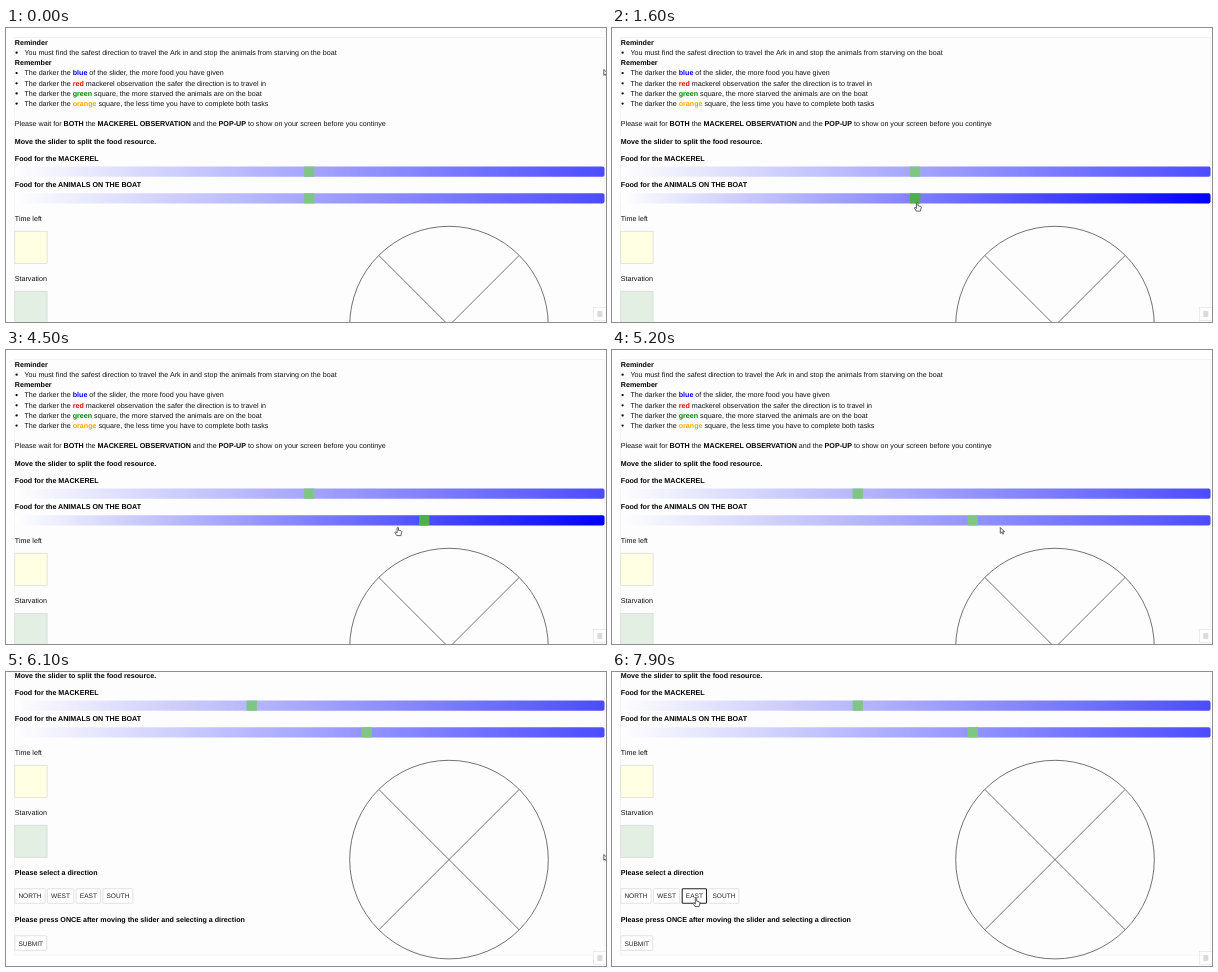
An HTML page that plays this animation: 600x294 px, repeating every 8000 ms.

```html
<!DOCTYPE html>
<html lang="en">
<head>
<meta charset="utf-8">
<title>Food sliders</title>
<style>
  html, body { margin: 0; width: 100%; height: 100%; overflow: hidden; background: #fff; }
  svg { display: block; width: 600px; height: 294px; }
  text { font: 7.13px "Liberation Sans", Arial, sans-serif; fill: #111; white-space: pre; text-rendering: geometricPrecision; }
  .b { font-weight: bold; fill: #000; }
  text.button { font-size: 6.55px; fill: #222; }
</style>
</head>
<body>
<svg id="stage" viewBox="0 0 600 294">
  <defs>
    <linearGradient id="food">
      <stop offset="0" stop-color="#fff"/>
      <stop offset="1" stop-color="#00f"/>
    </linearGradient>
  </defs>
  <g id="page"></g>
  <g id="menu">
    <rect x="587.5" y="279.5" width="14" height="13" fill="#fff" stroke="#e4e4e4" stroke-width=".7"/>
    <path d="M591.3 284h5M591.3 286h5M591.3 288h5" stroke="#999" stroke-width=".7"/>
  </g>
  <g id="pointer" stroke="#222" stroke-width=".7" fill="#fff" stroke-linejoin="round">
    <path id="arrow" d="M0 0V5.8L1.4 4.6L2.4 6.6L3.3 6.2L2.4 4.2H4.2Z"/>
    <path id="hand" d="M-.7 .7Q0 -.4 .7 .7V3.2L3.4 3.9Q4.1 4.2 3.9 5.2L3.1 8.6H-1L-3 5.4Q-2.7 4.4 -1.6 5.2L-.7 5.9Z"/>
  </g>
</svg>
<script>
const LOOP = 8000, STEP = 100, SCROLL = 110;
const $ = id => document.getElementById(id);

// **bold** and {color:word} mark up the running text.
const markup = s => s
  .replace(/\*\*(.+?)\*\*/g, '<tspan class="b">$1</tspan>')
  .replace(/\{(\w+)\}/g, '<tspan class="b" style="fill:$1">$1</tspan>');
const label = (x, y, s) => `<text x="${x}" y="${y}">${markup(s)}</text>`;
const bullet = (y, s) => `<circle cx="10.6" cy="${y - 2.3}" r="1.15"/>` + label(18.4, y, s);
const square = (y, fill) =>
  `<rect x="8.8" y="${y}" width="32.3" height="32.3" fill="${fill}" stroke="#d2d2d2" stroke-width=".6"/>`;
const slider = (id, y) => `<g id="${id}">
  <rect x="8.8" y="${y}" width="589.7" height="10.2" rx="1.8" fill="url(#food)"/>
  <rect class="thumb" y="${y}" width="10.3" height="10.2" fill="#4caf50"/></g>`;
const button = (x, y, w, s) =>
  `<rect id="${s}" x="${x}" y="${y}" width="${w}" height="14.6" rx=".8" fill="#fff" stroke="#d6d6d6" stroke-width=".7"/>
   <text class="button" x="${x + 3.6}" y="${y + 9.7}">${s}</text>`;

$('page').innerHTML = [
  '<rect x="8.5" y="9.5" width="590" height="383.5" fill="#fdfdfd" stroke="#efefef" stroke-width=".7"/>',
  label(8.8, 16.8, '**Reminder**'),
  bullet(27, 'You must find the safest direction to travel the Ark in and stop the animals from starving on the boat'),
  label(8.8, 37.2, '**Remember**'),
  bullet(47.4, 'The darker the {blue} of the slider, the more food you have given'),
  bullet(57.6, 'The darker the {red} mackerel observation the safer the direction is to travel in'),
  bullet(67.7, 'The darker the {green} square, the more starved the animals are on the boat'),
  bullet(77.9, 'The darker the {orange} square, the less time you have to complete both tasks'),
  label(8.8, 98.2, 'Please wait for **BOTH** the **MACKEREL OBSERVATION** and the **POP-UP** to show on your screen before you continye'),
  label(8.8, 115.6, '**Move the slider to split the food resource.**'),
  label(8.8, 132.8, '**Food for the MACKEREL**'),
  slider('mackerel', 138.6),
  label(8.8, 159.4, '**Food for the ANIMALS ON THE BOAT**'),
  slider('animals', 165.2),
  label(8.8, 192.6, 'Time left'),
  square(203.2, '#ffffe3'),
  label(8.8, 252.6, 'Starvation'),
  square(263.2, '#e4efe3'),
  label(8.8, 312.6, '**Please select a direction**'),
  button(8.8, 326.7, 30.4, 'NORTH'),
  button(41.4, 326.7, 26.2, 'WEST'),
  button(70.2, 326.7, 24.3, 'EAST'),
  button(96.9, 326.7, 30, 'SOUTH'),
  label(8.8, 359.8, '**Please press ONCE after moving the slider and selecting a direction**'),
  button(8.8, 373.8, 32, 'SUBMIT'),
  `<g fill="none" stroke="#444" stroke-width=".75">
    <circle cx="443" cy="297.6" r="99.3"/>
    <path d="M373 227.6l140 140M513 227.6l-140 140"/></g>`
].join('');

const clamp = v => Math.min(1, Math.max(0, v));
const smooth = v => v * v * (3 - 2 * v);
const ramp = (t, from, to) => smooth(clamp((t - from) / (to - from)));

// Pointer tip: time, x, y
const path = [
  [900, 597.8, 41.5], [1250, 305.3, 174.5], [1900, 305.3, 174.5], [2300, 306.3, 169.5],
  [2900, 306.3, 169.5], [3600, 391.8, 177], [4800, 391.8, 177], [4950, 388.3, 177.5],
  [5200, 388.3, 177.5], [5500, 597.8, 103], [5700, 597.8, 103], [6100, 597.8, 182.5],
  [6500, 597.8, 182.5], [7400, 86, 230], [7500, 86, 230], [7700, 84, 226]
];

function pointerAt(t) {
  let i = path.findIndex(p => p[0] > t);
  if (i === 0) return path[0].slice(1);
  if (i < 0) return path[path.length - 1].slice(1);
  const [t0, x0, y0] = path[i - 1], [t1, x1, y1] = path[i];
  const k = ramp(t, t0, t1);
  return [x0 + (x1 - x0) * k, y0 + (y1 - y0) * k];
}

const setSlider = (id, value, opacity) => {
  $(id).setAttribute('opacity', opacity);
  $(id).querySelector('.thumb').setAttribute('x', 298.1 + (value - .5) * 575);
};

function draw(t) {
  const [x, y] = pointerAt(t);
  const released = t >= 4900;
  const dragged = x > 390.6 ? .7 : x > 332 ? .6 : .5;
  const animals = released ? .6 : t < 2900 ? .5 : dragged;
  const hover = ramp(t, 1200, 1430) - ramp(t, 4850, 5050);
  setSlider('mackerel', released ? .4 : .5, .7);
  setSlider('animals', animals, .7 + .3 * hover);

  const scroll = SCROLL * ramp(t, 5700, 6100);
  $('page').setAttribute('transform', `translate(0 ${-scroll})`);

  const chosen = t >= 7900;
  $('EAST').setAttribute('stroke', chosen ? '#222' : '#d6d6d6');
  $('EAST').setAttribute('stroke-width', chosen ? 1.1 : .7);

  const hand = (t >= 1200 && !released) || t >= 7400;
  $('pointer').setAttribute('transform', `translate(${x} ${y})`);
  $('hand').setAttribute('visibility', hand ? 'visible' : 'hidden');
  $('arrow').setAttribute('visibility', hand ? 'hidden' : 'visible');
}

const start = performance.now();
function tick() {
  const t = (performance.now() - start) % LOOP;
  draw(Math.floor(t / STEP) * STEP);
  requestAnimationFrame(tick);
}
tick();
</script>
</body>
</html>
```
